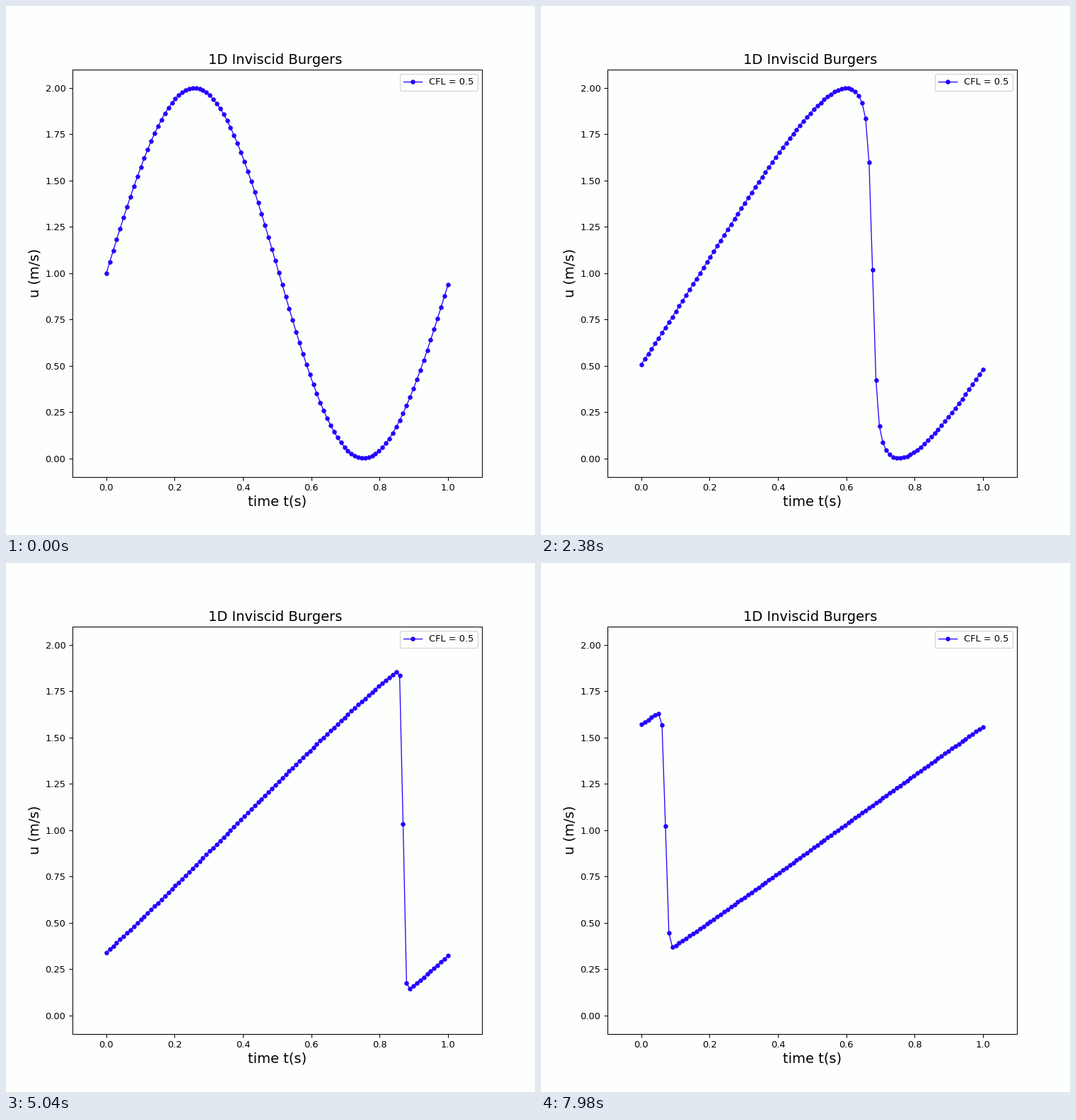
Animation of 748x748 px, one loop 8000 ms. Source, as a matplotlib script:

```python
import numpy as np
import matplotlib.pyplot as plt
from matplotlib.animation import FuncAnimation

SIZE = 748
DPI = 93.5
LOOP_MS = 8000
TICK_MS = 20
STEP_MS = 70
CELLS = 100
DT_DX = 0.5
PAPER = "#fdfffc"
BLUE = "#2200ff"


def advance(u):
    """One first-order upwind step of the inviscid equation, periodic in x."""
    flux = u ** 2 / 2
    return u - DT_DX * (flux - np.roll(flux, 1))


def solve(steps):
    centers = (np.arange(CELLS) + 0.5) / CELLS
    # The first state shown is already one step in.
    states = [advance(1 + np.sin(2 * 3.14 * centers))]
    for _ in range(steps):
        states.append(advance(states[-1]))
    return states


states = solve(LOOP_MS // STEP_MS)
x = np.linspace(0, 1, CELLS)

plt.rcParams["font.family"] = "DejaVu Sans"
fig, ax = plt.subplots(figsize=(SIZE / DPI, SIZE / DPI), dpi=DPI, facecolor=PAPER)
ax.set_facecolor(PAPER)
line, = ax.plot(x, states[0], "o-", color=BLUE, lw=1, ms=4, label="CFL = 0.5")
ax.set_xlim(-0.1, 1.1)
ax.set_ylim(-0.1, 2.1)
ax.set_xticks(np.arange(0, 1.1, 0.2))
ax.set_yticks(np.arange(0, 2.1, 0.25))
ax.set_title("1D Inviscid Burgers ", fontsize=15)
ax.set_xlabel("time t(s)", fontsize=15, labelpad=3)
ax.set_ylabel("u (m/s)", fontsize=15)
ax.legend(loc="upper right", facecolor=PAPER)


def draw(frame):
    # Steps fall on multiples of 70 ms, rounded to the 20 ms tick.
    step = (frame * TICK_MS + TICK_MS // 2) // STEP_MS
    line.set_ydata(states[step])
    return line,


anim = FuncAnimation(fig, draw, frames=LOOP_MS // TICK_MS, interval=TICK_MS,
                     repeat=True, repeat_delay=0)
plt.show()
```
